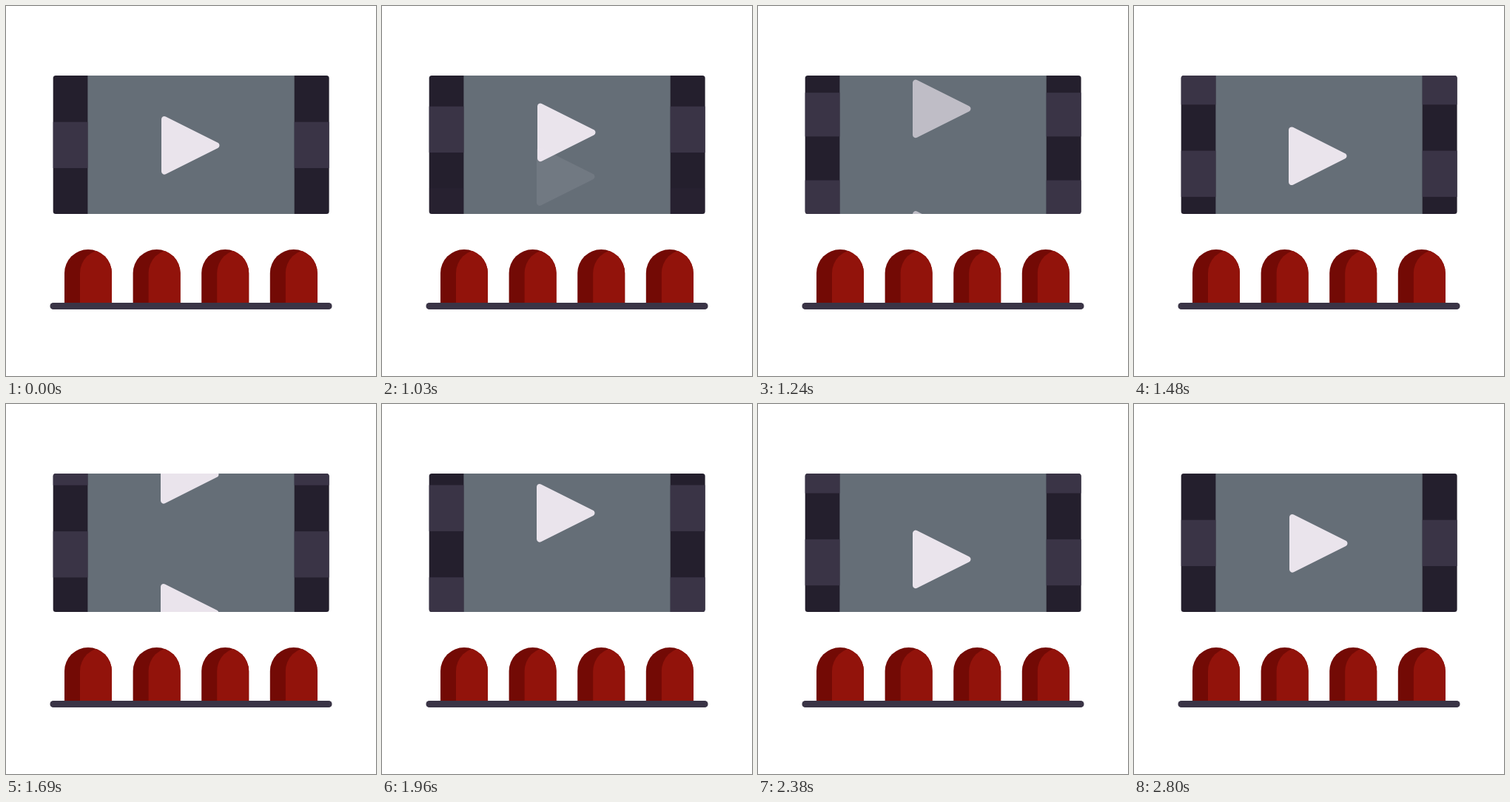
An HTML page with a canvas for the animation above (2.83 s loop, 500 px wide and 500 px high).

```html
<!DOCTYPE html>
<html lang="en">
<head>
<meta charset="utf-8">
<title>Cinema</title>
<style>
  html, body { margin: 0; width: 100%; height: 100%; overflow: hidden; background: #fff; }
  canvas { display: block; width: 500px; height: 500px; }
</style>
</head>
<body>
<canvas id="stage"></canvas>
<script>
const canvas = document.getElementById('stage');
const ctx = canvas.getContext('2d');
const ratio = window.devicePixelRatio || 1;
canvas.width = canvas.height = 500 * ratio;
ctx.scale(ratio, ratio);

const LOOP = 2830, START = 1030, STEP = 30, LAST = 60, BRAKE = 32, FADE = 11.8;
const DARK = '#241f2d', LIGHT = '#3a3446', SCREEN = '#656e77';
const PLAY = '#eae4ec', RED = '#92130b', SHADE = '#730a05';
const TOP = 94, BOTTOM = 281, BAND = 62.33, TILE = 187;
const BAND_REST = 156.7, SIGN_REST = 188.3;

const clamp = v => Math.max(0, Math.min(1, v));

// Distance still to travel: an almost steady run, then an ease-out.
function travel(n, rest, speed, drag, power) {
  const m = BRAKE - n;
  return m > 0
    ? rest + speed * m + drag * m * m
    : rest * Math.pow((LAST - n) / (LAST - BRAKE), power);
}

const bandsLeft = n => travel(n, 202.2, 20.59, 0.023, 2.95);
const signsLeft = n => travel(n, 146, 14.8, 0.0221, 2.76);

function rect(x, y, w, h, color) {
  ctx.fillStyle = color;
  ctx.fillRect(x, y, w, h);
}

function playSign(x, y) {
  ctx.fillStyle = PLAY;
  ctx.beginPath();
  ctx.moveTo(x, y);
  ctx.arcTo(x, y - 41.8, x + 83.4, y, 4);
  ctx.arcTo(x + 83.4, y, x, y + 41.8, 4);
  ctx.arcTo(x, y + 41.8, x, y, 4);
  ctx.closePath();
  ctx.fill();
}

function band(y, h) {
  rect(63, y, 47.4, h, LIGHT);
  rect(389.7, y, 47.4, h, LIGHT);
}

// The resting picture, sliding up and out.
function opening(n) {
  band(BAND_REST - 21 * n, BAND);
  playSign(210, SIGN_REST - 17.5 * n);
}

// The long strip that fades in while it stretches to full height.
function strip(n) {
  const fade = clamp(n / FADE);
  const zoom = 1 - 0.156 * (1 - fade);
  const place = y => TOP + (y - TOP) * zoom;

  ctx.globalAlpha = clamp(fade * 1.5);
  for (let i = -1; i < 7; i++) {
    band(place(BAND_REST + bandsLeft(n) - i * 2 * BAND), BAND * zoom);
  }

  ctx.globalAlpha = fade;
  const x = 209 + clamp((n - 46) / 14);
  for (let i = 0; i < 4; i++) {
    playSign(x, place(SIGN_REST + signsLeft(n) - i * TILE));
  }
  ctx.globalAlpha = 1;
}

function film(n) {
  ctx.save();
  ctx.beginPath();
  ctx.roundRect(63.7, TOP, 372.9, BOTTOM - TOP, 3.5);
  ctx.clip();
  rect(63, TOP, 375, BOTTOM - TOP, DARK);
  rect(110.4, TOP, 279.3, BOTTOM - TOP, SCREEN);
  if (n < BRAKE) opening(n);
  if (n > 0) strip(n);
  ctx.restore();
}

function arch(x) {
  ctx.beginPath();
  ctx.moveTo(x, 403);
  ctx.lineTo(x, 361);
  ctx.arc(x + 32, 361, 32, Math.PI, 0);
  ctx.lineTo(x + 64, 403);
  ctx.closePath();
}

function seat(x) {
  ctx.save();
  arch(x);
  ctx.fillStyle = SHADE;
  ctx.fill();
  ctx.clip();
  arch(x + 21);
  ctx.fillStyle = RED;
  ctx.fill();
  ctx.restore();
}

function draw(time) {
  const t = time % LOOP;
  const n = t < START ? 0 : Math.min(LAST, Math.floor((t - START) / STEP) + 1);
  rect(0, 0, 500, 500, '#fff');
  film(n);
  for (let i = 0; i < 4; i++) seat(79 + 92.6 * i);
  ctx.beginPath();
  ctx.roundRect(59.5, 401, 381, 9, 4.3);
  ctx.fillStyle = LIGHT;
  ctx.fill();
}

const begin = performance.now();
function tick() {
  draw(performance.now() - begin);
  requestAnimationFrame(tick);
}
tick();
</script>
</body>
</html>
```
